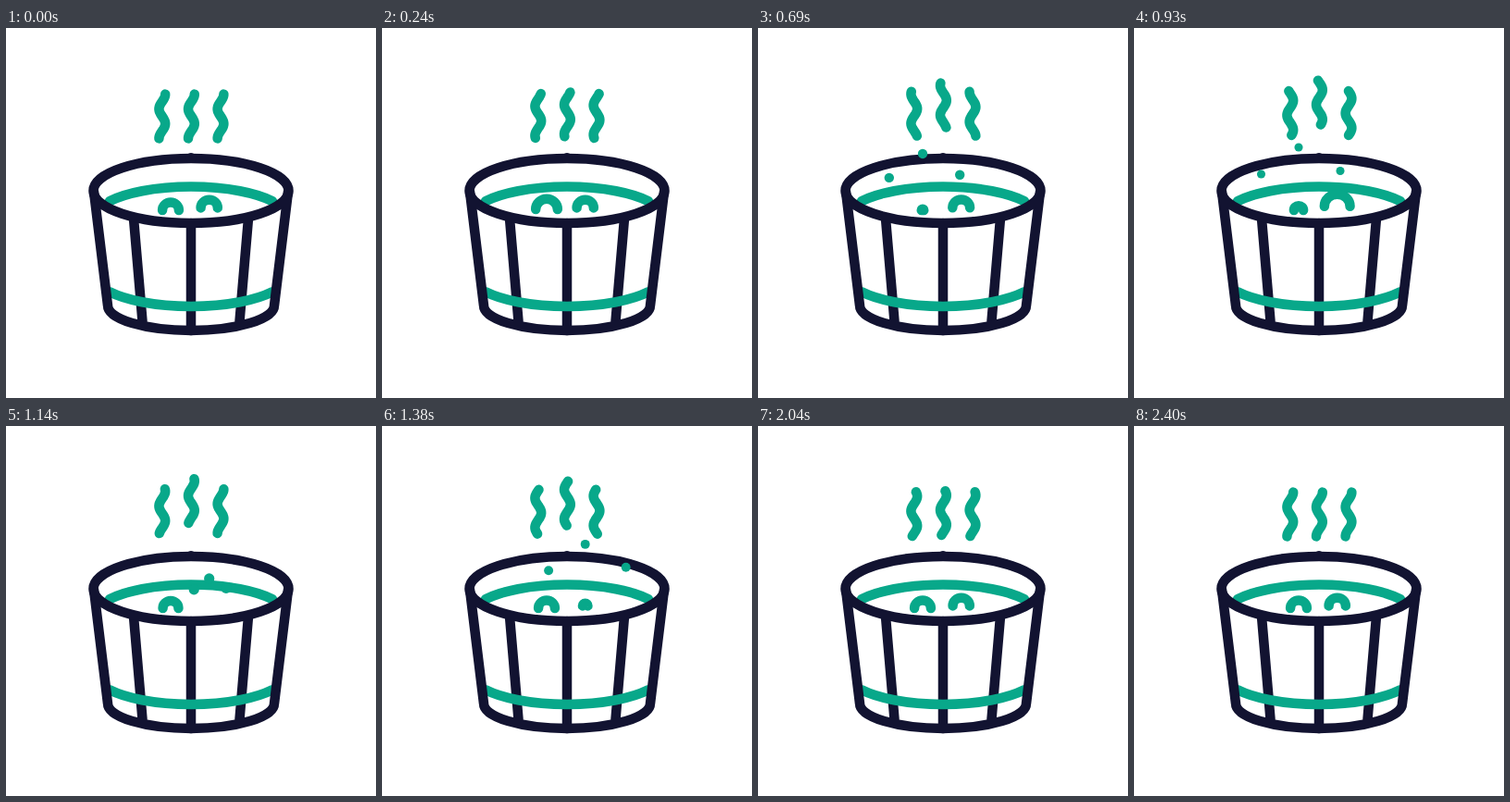
Write an HTML page that moves like this. It is 400x400 px and loops after 4430 ms.

```html
<!DOCTYPE html>
<html lang="en">
<head>
<meta charset="utf-8">
<title>Hot tub</title>
<style>
  html, body { margin: 0; width: 100%; height: 100%; overflow: hidden; background: #fff; }
  svg { display: block; width: 100%; height: 100%; }
  path, ellipse { fill: none; stroke-width: 10.5; stroke-linecap: round; stroke-linejoin: round; }
  .ink { stroke: #121331; }
  .teal { stroke: #08a88a; }
  circle { fill: #08a88a; }
</style>
</head>
<body>
<svg viewBox="0 0 400 400">
  <path class="ink" d="M200 211V327M138 206L147.5 317M262 206L252.5 317"/>
  <path class="teal" d="M112 285.3A105.5 35 0 0 0 288 285.3M112 187.2A105.5 35 0 0 1 288 187.2"/>
  <path class="ink" d="M95 177L110 300A90 27 0 0 0 290 300L305 177"/>
  <ellipse class="ink" cx="200" cy="176" rx="105.5" ry="35"/>
  <circle cx="200" cy="140.5" r="5.5" style="fill:#121331"/>
  <g id="live"></g>
</svg>
<script>
const LOOP = 4430, ACTIVE = 2400, STEP = 30;
const live = document.getElementById('live');

function add(tag, cls) {
  const el = document.createElementNS('http://www.w3.org/2000/svg', tag);
  if (cls) el.setAttribute('class', cls);
  return live.appendChild(el);
}
const clamp = (v) => Math.min(1, Math.max(0, v));
const ease = (v) => (1 - Math.cos(Math.PI * clamp(v))) / 2;

const steam = [
  { x: 168.8, lift: 3.5, lead: 0 },
  { x: 200.4, lift: 15, lead: 0 },
  { x: 232, lift: 3.5, lead: 60 }
].map((s) => ({ ...s, el: add('path', 'teal') }));

const bubbles = [
  { x: 178, y: 197, r: 8.9, pop: 480 },
  { x: 219.7, y: 194.4, r: 9.1, pop: 1080 }
].map((b) => ({
  ...b,
  el: add('path', 'teal'),
  drops: [[-40.5, -36], [0, -65], [45, -39.5]].map(([dx, dy]) => ({ dx, dy, el: add('circle') }))
}));

function drawSteam(s, t) {
  const p = clamp((t + (t > 0 ? s.lead : 0)) / ACTIVE);
  const phase = 4 * Math.PI * (0.8 * ease(p) + 0.2 * p);
  const rise = t < 980 ? ease(t / 980) : 1 - ease((t - 980) / 1320);
  const top = 71.6 - s.lift * rise;
  let d = '';
  for (let i = 0; i <= 32; i++) {
    const k = i / 32;
    const x = s.x + 3.4 * Math.cos(3 * Math.PI * k + phase);
    d += (i ? 'L' : 'M') + x.toFixed(2) + ' ' + (top + 47.8 * k).toFixed(2);
  }
  s.el.setAttribute('d', d);
}

function drawBubble(b, t) {
  const age = t - b.pop;
  const swell = age < 0 ? ease((age + 450) / 430) : 0;
  const grown = age < 0 ? 1 : clamp((age - 130) / 560);
  const r = b.r * grown + 6 * swell;
  const y = b.y - 2 * swell;
  b.el.style.display = grown > 0 ? '' : 'none';
  b.el.setAttribute('d', `M${b.x - r} ${y}A${r} ${r * 0.95} 0 0 1 ${b.x + r} ${y}`);

  const out = 1 - (1 - clamp(age / 490)) ** 4;
  const size = age >= 0 && age < 640 ? 5.8 - 0.0028 * age : 0;
  for (const drop of b.drops) {
    drop.el.setAttribute('cx', b.x + drop.dx * out);
    drop.el.setAttribute('cy', b.y - 3 + drop.dy * out);
    drop.el.setAttribute('r', size);
  }
}

function draw(now) {
  const t = Math.min(ACTIVE, Math.floor((now % LOOP) / STEP) * STEP);
  steam.forEach((s) => drawSteam(s, t));
  bubbles.forEach((b) => drawBubble(b, t));
}

const start = performance.now();
function tick() {
  draw(performance.now() - start);
  requestAnimationFrame(tick);
}
tick();
</script>
</body>
</html>
```
